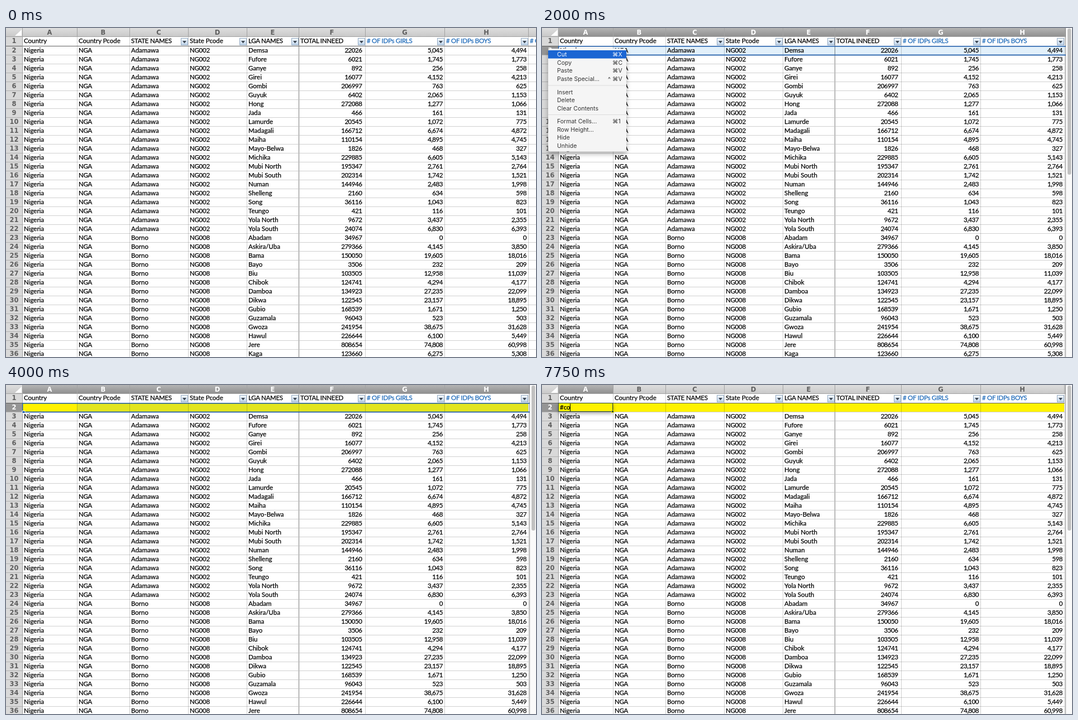
Recreate the animation shown at these times as an HTML page. Size 949 by 590 pixels, loop 8 s.

```html
<!DOCTYPE html>
<html lang="en">
<head>
<meta charset="utf-8">
<title>Inserting a row in a spreadsheet</title>
<style>
  html, body { margin: 0; width: 100%; height: 100%; overflow: hidden; background: #fff; }
  svg { display: block; }
  text { white-space: pre; }
  .cell { font: 11.5px Lato, sans-serif; fill: #000; stroke: #000; stroke-width: .25px; }
  .caps { letter-spacing: -.28px; }
  .num { letter-spacing: -.45px; text-anchor: end; }
  .blue { fill: #1b68b8; stroke: #1b68b8; }
  .head { font: bold 11.5px "DejaVu Sans", sans-serif; fill: #5f5f5f; text-anchor: middle; }
  .head.on { fill: #fff; }
  .menu text { font: 10.5px Inter, "DejaVu Sans", sans-serif; fill: #333; }
  .menu .on text { fill: #fff; }
  .menu .bar { fill: none; }
  .menu .on .bar { fill: #1b66d3; }
  .panel { filter: drop-shadow(0 4px 4px rgba(0, 0, 0, .32)); }
  .lift { filter: drop-shadow(0 3px 3px rgba(0, 0, 0, .35)); }
</style>
</head>
<body>
<svg id="stage" width="949" height="590" viewBox="0 0 949 590">
  <defs>
    <linearGradient id="colOff" x2="0" y2="1"><stop stop-color="#dedede"/><stop offset="1" stop-color="#c9c9c9"/></linearGradient>
    <linearGradient id="colOn" x2="0" y2="1"><stop stop-color="#b4b4b4"/><stop offset="1" stop-color="#909090"/></linearGradient>
    <linearGradient id="button" x2="0" y2="1"><stop stop-color="#f7fbff"/><stop offset="1" stop-color="#bdd3ea"/></linearGradient>
  </defs>
</svg>
<script>
const LOOP = 8000, W = 949, H = 590;
const edges = [29, 127, 221, 326, 431, 524, 643, 785, 935, 1040];
const titles = ['Country', 'Country Pcode', 'STATE NAMES', 'State Pcode', 'LGA NAMES',
  'TOTAL INNEED', '# OF IDPs GIRLS', '# OF IDPs BOYS', '# OF IDPs'];
const areas = `Demsa,22026,5045,4494
Fufore,6021,1745,1773
Ganye,892,256,258
Girei,16077,4152,4213
Gombi,206997,763,625
Guyuk,6402,2065,1153
Hong,272088,1277,1066
Jada,466,161,131
Lamurde,20545,1072,775
Madagali,166712,6674,4872
Maiha,110154,4895,4745
Mayo-Belwa,1826,468,327
Michika,229885,6605,5143
Mubi North,195347,2761,2764
Mubi South,202314,1742,1521
Numan,144946,2483,1998
Shelleng,2160,634,598
Song,36116,1043,823
Teungo,421,116,101
Yola North,9672,3437,2355
Yola South,24074,6830,6393
Abadam,34967,0,0
Askira/Uba,279366,4145,3850
Bama,150050,19605,18016
Bayo,3506,232,209
Biu,103505,12958,11039
Chibok,124741,4294,4177
Damboa,134923,27235,22099
Dikwa,122545,23157,18895
Gubio,168539,1671,1250
Guzamala,96043,523,503
Gwoza,241954,38675,31628
Hawul,226644,6100,5449
Jere,808654,74808,60998
Kaga,123660,6275,5308`.split('\n').map(line => line.split(','));

const stage = document.getElementById('stage');

function add(parent, tag, attrs = {}, content) {
  const el = document.createElementNS('http://www.w3.org/2000/svg', tag);
  for (const key in attrs) el.setAttribute(key, attrs[key]);
  if (content !== undefined) el.textContent = content;
  parent.append(el);
  return el;
}
const group = (parent = stage, attrs) => add(parent, 'g', attrs);
const rect = (p, x, y, width, height, fill, more) => add(p, 'rect', { x, y, width, height, fill, ...more });
const label = (p, x, y, str, cls = '') => add(p, 'text', { x, y, class: cls }, str);
const cellText = (p, x, y, str, cls = '') =>
  label(p, x, y, str, `cell ${/[A-Z]{2}/.test(str) ? 'caps' : ''} ${cls}`);
const show = (el, on) => { el.style.display = on ? '' : 'none'; };
const rowTop = n => n === 1 ? 16 : 16 * n + 1;
const baseline = n => n === 1 ? 27 : 16 * n + 12;

// Cell fills; the pane line lies under a coloured row
rect(stage, 0, 0, W, H, '#fff');
rect(stage, 524, 16, 1, H, '#999');
const yellow = rect(stage, 30, 33, 905, 15, '#fff200');
const tint = rect(stage, 127, 0, 809, 15, 'rgba(55,150,215,.14)');

// Grid
for (let n = 2; n <= 36; n++) rect(stage, 30, 16 * n + 16, 919, 1, '#d0d0d0');
for (const x of edges) rect(stage, x, 16, 1, H, 'rgba(0,0,0,.19)');

// Heading row
titles.forEach((str, i) => cellText(stage, edges[i] + 3, baseline(1), str, i > 5 ? 'blue' : ''));
for (let i = 2; i < 8; i++) {
  const x = edges[i + 1] - 13;
  rect(stage, x + .5, 18.5, 12, 12, 'url(#button)', { stroke: '#93a9c1' });
  add(stage, 'path', { d: `M${x + 3} 23h7l-3.5 4.5z`, fill: '#3c4652' });
}

// Data rows
const data = group();
areas.forEach(([name, ...counts], i) => {
  const y = baseline(i + 2);
  const state = i < 21 ? ['Adamawa', 'NG002'] : ['Borno', 'NG008'];
  ['Nigeria', 'NGA', ...state, name].forEach((str, c) => cellText(data, edges[c] + 3, y, str));
  counts.forEach((n, c) => {
    const str = c ? Number(n).toLocaleString('en-US') : n;
    cellText(data, c ? edges[c + 6] - 3 : 637.5, y, str, 'num');
  });
});

// Frozen pane line
rect(stage, 0, 32, W, 1, '#606060');

// Row and column headers
const header = (x, y, w, h, str, tx, ty) => ({
  box: rect(stage, x, y, w, h),
  text: label(stage, tx, ty, str, 'head')
});
const setHeader = (hd, on, fill) => {
  hd.box.setAttribute('fill', fill);
  hd.text.classList.toggle('on', on);
};
const rowHeads = [];
for (let n = 1; n <= 36; n++) {
  const y = rowTop(n);
  rowHeads.push(header(0, y, 29, n === 1 ? 16 : 15, n, 14.5, baseline(n)));
  rect(stage, 0, n === 1 ? 32 : y + 15, 29, 1, n === 1 ? '#606060' : '#b0b0b0');
}
const colHeads = [...'ABCDEFGHI'].map((c, i) =>
  header(edges[i], 0, edges[i + 1] - edges[i], 15, c, (edges[i] + edges[i + 1]) / 2, 11.5));
rect(stage, 0, 0, 29, 15, 'url(#colOff)');
add(stage, 'path', { d: 'M28 3V14H16Z', fill: '#fff' });
for (const x of edges) rect(stage, x, 0, 1, 15, '#a2a2a2');
rect(stage, 0, 15, W, 1, '#a2a2a2');
rect(stage, 29, 15, 1, H, '#a2a2a2');

// Scrollbar
const scroll = group();
rect(scroll, 936, 16, 2, H, '#fff');
rect(scroll, 937, 0, 1, H, '#8c8c8c');
rect(scroll, 938, 0, 11, H, '#fafafa');
const thumb = rect(scroll, 941, 1, 6.5, 262, '#c1c1c1', { rx: 3.2 });

// Selections
const rowSel = group();
const BLUE = '#2460ab';
rect(rowSel, 29, -1, 909, 1.6, BLUE);
rect(rowSel, 29, 14.6, 909, 1.8, BLUE);
rect(rowSel, 29, 0, 1.4, 16, BLUE);
rect(rowSel, 29, 13.5, 5, 4, BLUE, { stroke: '#fff', 'stroke-width': .8 });

const cellSel = group();
const frame = rect(cellSel, 29.5, 32.5, 97, 15, '#fff200', { stroke: '#2c4c3c' });
rect(cellSel, 124.5, 45.5, 4, 4, '#2c4c3c', { stroke: '#fff200', 'stroke-width': .8 });
const typed = cellText(cellSel, 32, baseline(2), '');
const caret = rect(cellSel, 39, 33.5, 1, 14, '#000');

// Context menu
const menu = group(stage, { class: 'menu' });
rect(menu, 11, 37, 140, 184.5, '#f5f5f5', { rx: 3.5, class: 'panel' });
for (const y of [102.5, 155]) rect(menu, 11, y, 140, 1, '#dcdcdc');
const items = [
  ['Cut', 47.3, 'X'], ['Copy', 61.9, 'C'], ['Paste', 76.5, 'V'], ['Paste Special...', 91.1, 'V', '^'],
  ['Insert', 114.6], ['Delete', 129.2], ['Clear Contents', 143.8],
  ['Format Cells...', 167.3, '1'], ['Row Height...', 181.9], ['Hide', 196.5], ['Unhide', 211.1]
].map(([str, y, key, ctrl]) => {
  const g = group(menu);
  add(g, 'rect', { x: 11, y: y - 7.3, width: 140, height: 14.6, class: 'bar' });
  label(g, 27, y + 3.9, str);
  if (key) {
    label(g, 126, y + 3.9, '⌘');
    label(g, 136.5, y + 3.9, key);
  }
  if (ctrl) label(g, 118, y + 3.9, ctrl);
  return g;
});

// Each step adds to the state left by the one before it
const steps = [
  [0, { row: 0, cell: false, cols: 0, fade: 0, pick: -1, inserted: false, edit: false, text: '', caret: 0 }],
  [500, { row: 1, cols: 9 }],
  [1250, { row: 2 }],
  [2000, { fade: 1, pick: 0 }],
  [2500, { pick: 1 }],
  [2750, { pick: 3 }],
  [3000, { pick: 4 }],
  [3500, { fade: .5 }],
  [3750, { fade: 0 }],
  [4000, { inserted: true }],
  [5000, { cell: true, cols: 1 }],
  [6750, { edit: true, text: '#', caret: 39 }],
  [7250, { caret: 0 }],
  [7750, { text: '#co', caret: 50 }]
];
const states = [];
for (const [at, change] of steps) states.push({ ...states.at(-1), ...change, at });

function draw(s) {
  const rowOn = s.row > 0 && !s.cell;
  show(scroll, s.at >= 500);
  thumb.setAttribute('height', s.inserted ? 260 : 262);
  show(tint, rowOn);
  show(rowSel, rowOn);
  if (rowOn) {
    tint.setAttribute('y', rowTop(s.row));
    rowSel.setAttribute('transform', `translate(0 ${rowTop(s.row)})`);
  }
  data.setAttribute('transform', `translate(0 ${s.inserted ? 16 : 0})`);
  show(yellow, s.inserted);
  colHeads.forEach((hd, i) => setHeader(hd, i < s.cols, i < s.cols ? 'url(#colOn)' : 'url(#colOff)'));
  rowHeads.forEach((hd, i) => setHeader(hd, i + 1 === s.row, i + 1 === s.row ? '#959595' : '#d9d9d9'));
  show(cellSel, s.cell);
  frame.setAttribute('stroke-width', s.edit ? 1 : 2);
  frame.classList.toggle('lift', s.edit);
  typed.textContent = s.text;
  show(caret, s.caret);
  caret.setAttribute('x', s.caret);
  show(menu, s.fade);
  menu.setAttribute('opacity', s.fade);
  items.forEach((g, i) => g.classList.toggle('on', i === s.pick));
}

let current;
function tick() {
  const t = performance.now() % LOOP;
  const next = states.findLast(s => s.at <= t);
  if (next !== current) draw(current = next);
  requestAnimationFrame(tick);
}
tick();
</script>
</body>
</html>
```
